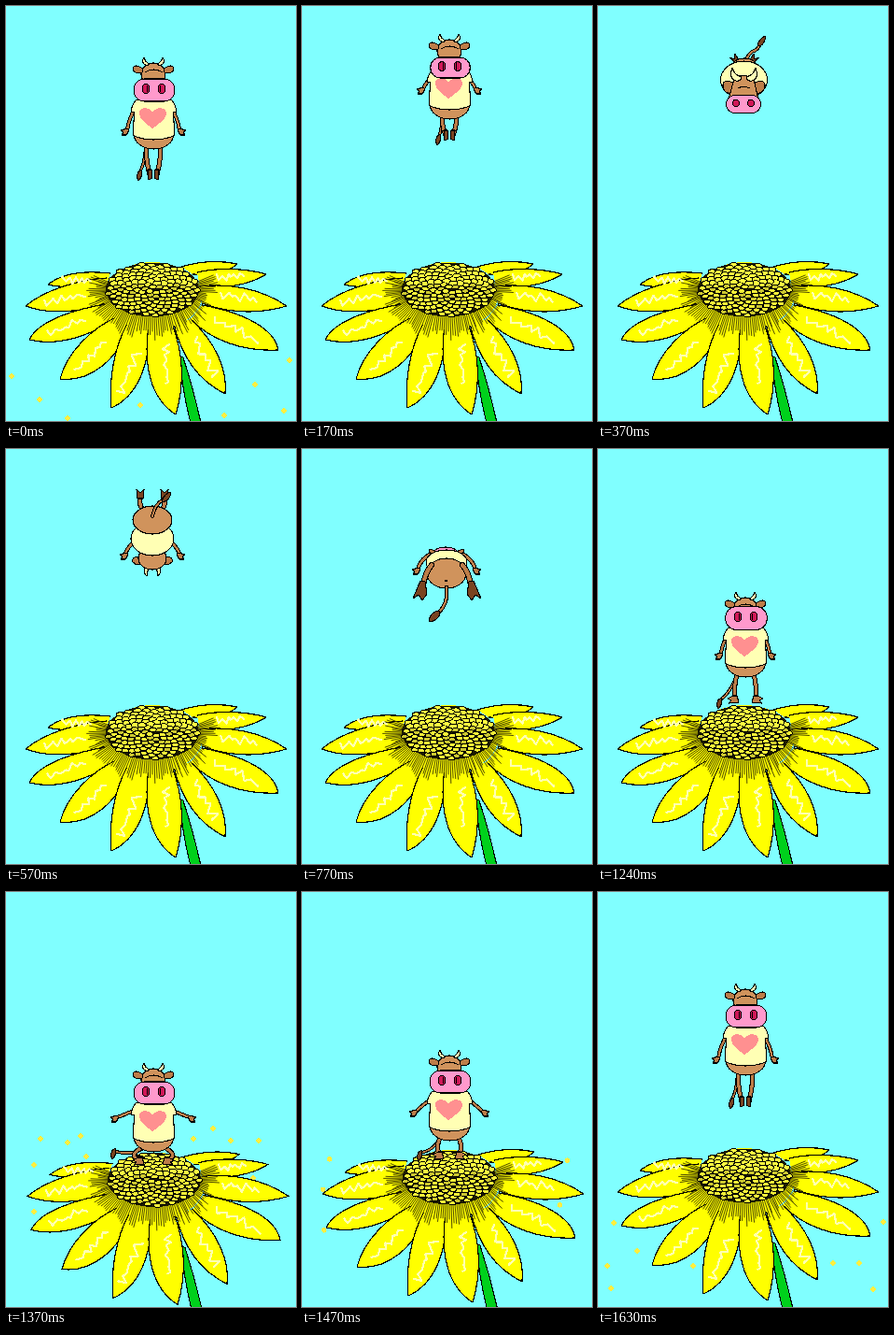
Write an HTML page that moves like this. It is 311 by 444 pixels and loops after 1700 ms.

```html
<!DOCTYPE html>
<html lang="en">
<head>
<meta charset="utf-8">
<title>Cow on a sunflower</title>
<style>
html, body { margin: 0; width: 100%; height: 100%; overflow: hidden; background: #80ffff; }
svg { display: block; width: 100vw; height: 100vh; }
</style>
</head>
<body>
<svg viewBox="0 0 311 444" shape-rendering="crispEdges" stroke-linecap="round" stroke-linejoin="round">
  <g id="pollen" fill="#ffee40"></g>
  <g id="flower"></g>
  <g id="cow"></g>
</svg>
<script>
const $ = id => document.getElementById(id);
const BROWN = '#bd7d48', TAN = '#d0935c', DARK = '#7a4420', CREAM = '#ffffb4', PINK = '#ff99cc', RED = '#d01858';
const LOOP = 1700;
const STEPS = [0, 70, 170, 270, 370, 470, 570, 670, 770, 870, 970, 1060, 1120, 1180, 1240, 1300, 1370, 1470, 1560, 1630];

let seed = 7;
const rnd = () => (seed = seed * 16807 % 2147483647) / 2147483647;

const path = (d, fill = 'none', stroke = '#000', w = 1.1) =>
  `<path d="${d}" fill="${fill}" stroke="${stroke}" stroke-width="${w}"/>`;
const oval = (x, y, rx, ry, fill, w = 1.1) =>
  `<ellipse cx="${x}" cy="${y}" rx="${rx}" ry="${ry}" fill="${fill}" stroke="#000" stroke-width="${w}"/>`;
const pill = (x, y, rx, ry, fill) =>
  `<rect x="${x - rx}" y="${y - ry}" width="${2 * rx}" height="${2 * ry}" rx="${ry * .95}" fill="${fill}" stroke="#000" stroke-width="1.1"/>`;
const limb = (d, w = 3, color = BROWN) => path(d, 'none', '#000', w + 2) + path(d, 'none', color, w);
const move = (s, x, y, k = 1) => `<g transform="translate(${x} ${y}) scale(1 ${k})">${s}</g>`;
// Draws a part and its mirror image around x = c
const both = (s, c = 158) => `${s}<g transform="translate(${2 * c} 0) scale(-1 1)">${s}</g>`;

/* Flower */
const PETALS = [
  'M112 286C85 283 60 286 45 298C65 303 90 300 108 297',
  'M200 287C220 288 240 284 248 276C225 271 205 274 188 279',
  'M208 300C235 303 262 298 279 287C255 280 225 280 205 285',
  'M108 291C75 293 40 305 21 321C45 330 80 329 112 316',
  'M210 318C240 329 270 330 301 321C275 303 240 296 208 300',
  'M112 318C75 324 35 336 25 357C55 365 95 352 122 331',
  'M198 335C220 358 255 370 292 368C288 345 255 328 210 320',
  'M180 340C188 375 205 400 235 415C238 390 225 360 198 335',
  'M122 331C90 345 65 372 58 399C90 403 120 378 132 343',
  'M130 340C116 365 110 400 113 430C140 418 155 385 153 343',
  'M153 343C147 385 155 420 182 437C192 405 190 370 178 340'
];
const SHINES = [
  [62, 294, 90, 292], [40, 319, 82, 309], [45, 352, 85, 335], [76, 390, 106, 358], [122, 415, 140, 372],
  [173, 405, 170, 360], [225, 395, 200, 355], [270, 357, 222, 335], [270, 315, 230, 308], [255, 288, 225, 291]
];

function shine([x1, y1, x2, y2]) {
  const len = Math.hypot(x2 - x1, y2 - y1), n = 9;
  let d = '';
  for (let i = 0; i <= n; i++) {
    const k = (i + rnd() - .5) / n, off = (i % 2 ? 1 : -1) * rnd() * 5;
    const x = x1 + (x2 - x1) * k - (y2 - y1) / len * off;
    const y = y1 + (y2 - y1) * k + (x2 - x1) / len * off;
    d += `${i ? 'L' : 'M'}${x.toFixed(1)} ${y.toFixed(1)}`;
  }
  return path(d, 'none', '#ffffb0', 2.2);
}

function flower() {
  let s = path('M186 374Q189 412 198 446L209 446Q201 410 190 376z', '#00d01c');
  for (const d of PETALS) s += path(d, '#ff0', '#000', 1.2);
  s += '<ellipse cx="157" cy="310" rx="53" ry="36" fill="#ff0"/>';
  s += SHINES.map(shine).join('');

  // Dark fringe fanning out from the seed head
  let fringe = '';
  for (let i = 0; i < 95; i++) {
    const a = (-18 + 216 * i / 94) * Math.PI / 180, r = 1.08 + rnd() * .26;
    const c = Math.cos(a), q = Math.sin(a);
    fringe += `M${(157 + 49 * c).toFixed(1)} ${(304 + 27 * q).toFixed(1)}L${(157 + 53 * r * c).toFixed(1)} ${(304 + 40 * r * q).toFixed(1)}`;
  }
  s += path(fringe, 'none', '#3c3800', .9);

  s += '<ellipse cx="157" cy="303.5" rx="50" ry="29" fill="#1c1a00"/>';
  const n = 145;
  for (let i = n; i > 0; i--) {
    const r = Math.sqrt(i / n), a = i * 2.39996;
    const x = 157 + 48 * r * Math.cos(a), y = 303.5 + 27.5 * r * Math.sin(a);
    const top = y < 298;
    const fill = top ? '#ffff40' : rnd() < .75 ? '#f4f038' : '#ccc830';
    s += oval(x.toFixed(1), y.toFixed(1), top ? 4.5 : 3.7, top ? 2.9 : 2.2, fill, 1);
  }
  return s;
}

/* Pollen: position at 1370, 1630 and 1700 ms */
const POLLEN = [
  [37, 264, 17, 354, 6, 396], [66, 268, 42, 384, 36, 421], [30, 292, 10, 400, 0, 450], [30, 342, 14, 424, 8, 460],
  [80, 261, 72, 395, 66, 441], [86, 283, 102, 400, 144, 427], [222, 253, 226, 408, 234, 438],
  [201, 264, 252, 397, 267, 405], [241, 266, 280, 397, 298, 433], [271, 266, 306, 353, 304, 379],
  [265, 306, 295, 425, 300, 460]
];

function pollen(t) {
  if (t >= 70 && t < 1370) return '';
  const u = t < 70 ? t + LOOP : t;
  return POLLEN.map(p => {
    const late = u >= 1630, i = late ? 2 : 0;
    const k = late ? (u - 1630) / 70 : (u - 1370) / 260, e = late ? k : k * (.4 + .6 * k);
    const x = p[i] + (p[i + 2] - p[i]) * k, y = p[i + 1] + (p[i + 3] - p[i + 1]) * e;
    return `<circle cx="${x}" cy="${y}" r="2.7"/>`;
  }).join('');
}

/* Cow */
const heart = path('M157 131C150 126 143 121 143 115C143 108 153 107 157 114C161 107 172 108 172 115C172 121 164 126 157 131z', '#ff9090', 'none');
const hornsAndEars =
  both(path('M147 67Q137 61 136 67Q137 73 146 71z', BROWN) + path('M151 64Q144 61 148 55Q149 60 154 62z', CREAM));
const hand = (x, y) => path(`M${x + 4} ${y - 5}L${x - 3} ${y - 3}L${x} ${y - 1}L${x - 2} ${y + 2}L${x + 3} ${y + 2}L${x + 6} ${y - 3}z`, BROWN);

// skull and snout are downward shifts, foot and knee are distances from the middle
function front({ x = 0, y, skull = 0, snout = 0, ry = 12, arm = 32, armY = 136, foot = 4, knee = 8, footY = 182, tail = [143, 184] }) {
  const [tx, ty] = tail, hx = 158 - arm, sy = 90 + snout, fx = 158 - foot;
  const hanging = foot < 7;
  const hoof = hanging
    ? path(`M${fx - 2} ${footY - 7}L${fx - 1} ${footY + 4}L${fx + 3} ${footY + 2}L${fx + 2} ${footY - 7}z`, DARK)
    : path(`M${fx - 2} ${footY - 5}L${fx - 8} ${footY - 2}L${fx - 4} ${footY}L${fx - 7} ${footY + 3}L${fx + 4} ${footY + 2}L${fx + 2} ${footY - 5}z`, BROWN);
  let s = limb(`M150 148Q${(tx + 154) / 2} ${(ty + 150) / 2 + 4} ${tx} ${ty - 6}`, 1.5)
    + path(`M${tx + 2} ${ty - 9}Q${tx - 5} ${ty - 4} ${tx - 1} ${ty + 3}Q${tx + 5} ${ty - 3} ${tx + 2} ${ty - 9}z`, DARK)
    + both(limb(`M150 146Q${158 - knee} ${(150 + footY) / 2} ${fx} ${footY - 2}`, 3.2) + hoof)
    + oval(158.5, 138, 21, 15, TAN)
    + both(limb(`M139 108Q${(138 + hx) / 2 - 1} ${(109 + armY) / 2} ${hx + 4} ${armY - 3}`, 2.2) + hand(hx, armY))
    + path('M146 99L139 101Q135 106 134 113L138 114Q136 128 137 139Q158 147 180 139Q181 128 179 114L183 113Q182 106 178 101L171 99z', CREAM)
    + heart
    + move(oval(158, 73, 13, 12, TAN) + hornsAndEars + path('M149 71Q158 65 168 71'), 0, skull)
    + pill(159, sy, 13.5 + ry * .7, ry, PINK)
    + both(oval(150, sy - 1.5, 3.8, ry * .44, RED) + path(`M151.5 ${sy - 4}v5`), 158.5);
  return move(s, x, y);
}

// Seen from above, head towards the viewer
function above() {
  return limb('M158 64Q158 55 165 49Q172 47 174 40', 1.8)
    + path('M171 42Q173 34 180 32Q179 40 174 43z', DARK)
    + both(path('M149 62L141 55L146 57L147 51L151 58z', DARK), 157)
    + oval(157, 64, 13, 8, TAN)
    + oval(156.5, 79, 25, 20, CREAM)
    + both(path('M145 82Q133 77 134 87Q137 96 146 92z', BROWN), 156.5)
    + path('M146 78Q156 71 167 78L172 100L140 100z', TAN)
    + both(path('M148 80Q140 78 144 66Q146 74 154 76Q153 81 148 80z', CREAM), 156.5)
    + path('M150 88Q156 85 163 88')
    + pill(156, 105, 18.5, 9.5, PINK)
    + both(oval(148, 104, 3.5, 4, RED), 156);
}

// Head down, back towards the viewer
function back() {
  return both(limb('M148 68Q142 60 144 50', 3.4) + path('M141 53L140 43L144 47L148 43L147 53z', DARK)
      + limb('M138 98Q130 106 128 112', 2.4) + hand(125, 116), 157)
    + both(path('M150 122Q146 132 151 136Q151 130 155 126z', CREAM) + path('M146 116Q134 114 136 121Q141 126 147 122z', BROWN), 157)
    + oval(157, 117, 15, 12, TAN)
    + oval(157, 96, 23, 18, CREAM)
    + oval(157, 76, 21, 15, TAN)
    + limb('M157 72Q160 58 169 54', 1.8)
    + path('M167 56Q170 47 177 46Q176 54 169 57z', DARK);
}

// Seen from below, rump towards the viewer
function rear() {
  return both(path('M142 114Q134 110 137 107L143 109z', BROWN) + limb('M137 113Q129 117 125 126', 2.6) + hand(121, 132), 155)
    + oval(154, 110, 12, 5, PINK)
    + oval(155, 121, 22, 13, CREAM)
    + oval(155, 133, 21, 16, TAN)
    + both(limb('M139 124Q132 132 130 146', 4.2) + path('M127 141L119 160L125 156L129 162L134 155L132 142z', DARK), 155.5)
    + path('M153.5 141h1.5', 'none', '#000', 2)
    + limb('M155 148Q157 167 145 176', 2.2)
    + path('M147 173Q137 174 136 185Q146 184 148 176z', DARK);
}

const drop = (y, more) => front({ x: -2, y, skull: 15, snout: 4, ry: 11, arm: 30, armY: 132, foot: 12, knee: 10, footY: 178, tail: [128, 176], ...more });

const POSES = [
  () => front({ y: 0 }),
  () => front({ y: -28 }),
  () => front({ y: -32, skull: 7, snout: 8, ry: 11, armY: 124, footY: 172, tail: [146, 178] }),
  () => front({ y: -28, skull: 26, snout: 24, ry: 11, arm: 31, armY: 122, footY: 160, tail: [148, 164] }),
  above,
  () => move(back(), 0, 14, .74),
  back,
  () => move(back(), -1, 34, .8),
  rear,
  () => front({ x: -3, y: 22, skull: 30, snout: 9, ry: 8, arm: 33, armY: 127, foot: 16, knee: 17, footY: 169, tail: [134, 180] }),
  () => front({ x: -4, y: 33, skull: 22, snout: 8, ry: 9, arm: 29, armY: 134, foot: 13, knee: 10, footY: 177, tail: [126, 174] }),
  () => drop(52),
  () => drop(65),
  () => drop(78, { x: -1 }),
  () => front({ y: 91, skull: 7, ry: 12.5, arm: 30, armY: 132, foot: 11, knee: 13, footY: 178, tail: [130, 184] }),
  () => front({ y: 110, skull: 5, arm: 37, armY: 125, foot: 13, knee: 18, footY: 171, tail: [121, 168] }),
  () => front({ y: 125, skull: 3, arm: 43, armY: 119, foot: 14, knee: 30, footY: 164, tail: [115, 158] }),
  () => front({ y: 113, skull: 1, arm: 40, armY: 125, foot: 10, knee: 16, footY: 170, tail: [126, 172] }),
  () => front({ y: 83, arm: 36, armY: 134, footY: 183, tail: [140, 186] }),
  () => front({ y: 43, arm: 33, armY: 138, footY: 183, tail: [143, 186] })
];

// The flower gives way under the landing
const SINK = { 15: [1, 3], 16: [2, 4.5], 17: [1, 2] };

$('flower').innerHTML = flower();
let shown = -1;

function draw() {
  const t = performance.now() % LOOP;
  const step = STEPS.findLastIndex(s => s <= t);
  if (step !== shown) {
    shown = step;
    $('cow').innerHTML = POSES[step]();
    $('pollen').innerHTML = pollen(STEPS[step]);
    $('flower').setAttribute('transform', `translate(${SINK[step] || [0, 0]})`);
  }
  requestAnimationFrame(draw);
}
draw();
</script>
</body>
</html>
```
